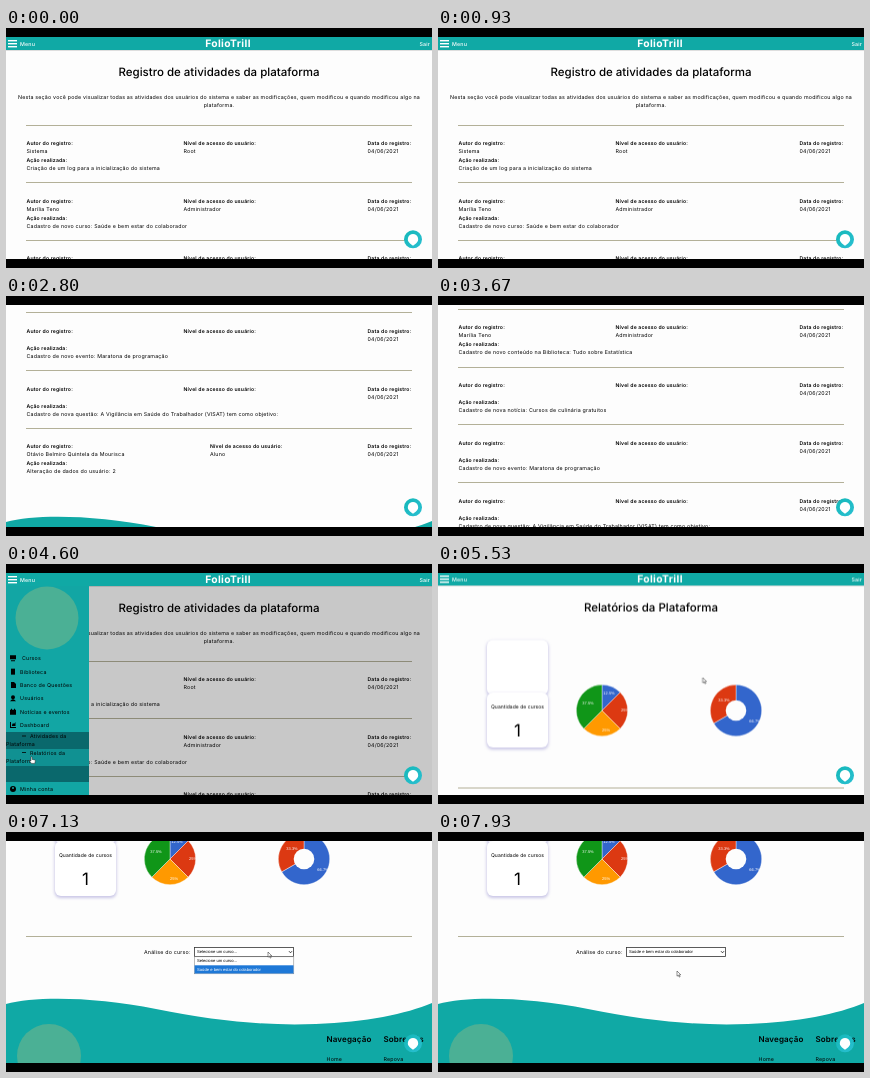
Recreate the animation shown at these times as an HTML page. Size 426x240 px, loop 8000 ms.

```html
<!DOCTYPE html>
<html lang="pt-BR">
<head>
<meta charset="utf-8">
<title>Registro de atividades</title>
<style>
  html, body { margin: 0; width: 100%; height: 100%; overflow: hidden; background: #000; }
  svg { display: block; width: 100vw; height: 100vh; }
  text { font-family: Inter, "Open Sans", sans-serif; text-rendering: geometricPrecision; }
  .native { font-family: "Liberation Sans", Arial, sans-serif; }
</style>
</head>
<body>
<svg id="stage" viewBox="0 0 426 240" xmlns="http://www.w3.org/2000/svg"></svg>
<script>
const LOOP = 8000;
const TEAL = '#10a9a5', INK = '#000', RULE = '#b3b098', LOGO = '#4bb095';
const ROW_TOP = 115, ROW_STEP = 57.7;
const LOG_END = 311, LOG_MID = 199, DASH_END = 120;

// y is the middle of the capital letters
function text(x, y, str, o = {}) {
  const { size = 5.3, weight = 400, fill = INK, anchor = 'start', gap = 0.2, cls = '' } = o;
  return `<text x="${x}" y="${y + size * 0.36}" font-size="${size}" font-weight="${weight}" fill="${fill}"
    text-anchor="${anchor}" letter-spacing="${gap}" class="${cls}">${str}</text>`;
}
const rect = (x, y, w, h, fill, extra = '') =>
  `<rect x="${x}" y="${y}" width="${w}" height="${h}" fill="${fill}" ${extra}/>`;
const circle = (x, y, r, fill) => `<circle cx="${x}" cy="${y}" r="${r}" fill="${fill}"/>`;
const rule = y => rect(20, Math.floor(y), 386, 1, RULE);
const label = (x, y, str) => text(x, y, str, { size: 5.1, weight: 600, gap: 0.18 });
const native = (x, y, str, fill = INK) => text(x, y, str, { size: 4.16, gap: 0, cls: 'native', fill });

function header() {
  const white = { fill: '#fff', weight: 500 };
  const bars = [12, 15, 18].map(y => rect(2, y, 9, 1.4, '#fff')).join('');
  return rect(0, 22, 426, 1, '#000', 'opacity=".12"') + rect(0, 0, 426, 22, TEAL) + bars +
    text(14, 16, 'Menu', white) + text(413.5, 16, 'Sair', white) +
    text(222, 15.5, 'FolioTrill', { size: 10.3, weight: 700, fill: '#fff', anchor: 'middle', gap: 0.35 });
}

const heading = str => text(213, 44, str, { size: 11.5, weight: 500, anchor: 'middle', gap: 0 });

function footer(dy) {
  const title = { size: 8, weight: 600, gap: 0.15 };
  return `<g transform="translate(0 ${dy})">
    <path d="M0 172C30 164 90 165 150 177S260 194 310 192S400 182 426 171V420H0Z" fill="${TEAL}"/>` +
    circle(43, 224, 32, LOGO) +
    text(320.5, 207, 'Navegação', title) + text(377.5, 207, 'Sobre nós', title) +
    text(320.5, 227.5, 'Home') + text(377.5, 227.5, 'Repova') + '</g>';
}

const ADMIN = ['Marília Teno', 'Administrador'];
const records = [
  ['Sistema', 'Root', 'Criação de um log para a inicialização do sistema'],
  [...ADMIN, 'Cadastro de novo curso: Saúde e bem estar do colaborador'],
  [...ADMIN, 'Cadastro de novo conteúdo na Biblioteca: Tudo sobre Estatística'],
  ['', '', 'Cadastro de nova notícia: Cursos de culinária gratuitos'],
  ['', '', 'Cadastro de novo evento: Maratona de programação'],
  ['', '', 'Cadastro de nova questão: A Vigilância em Saúde do Trabalhador (VISAT) tem como objetivo:'],
  ['Otávio Belmiro Quintela da Mourisca', 'Aluno', 'Alteração de dados do usuário: 2', 204],
];

function record([author, level, action, levelX = 177.5], i) {
  const top = ROW_TOP + i * ROW_STEP, y = Math.round(top);
  return rule(top - 18) +
    label(20.5, y, 'Autor do registro:') + text(20.5, y + 8.4, author) +
    label(levelX, y, 'Nível de acesso do usuário:') + text(levelX, y + 8.4, level) +
    label(361.5, y, 'Data do registro:') + text(361.5, y + 8.4, '04/06/2021') +
    label(20.5, y + 16.7, 'Ação realizada:') + text(20.5, y + 25.2, action);
}

function logPage() {
  const mid = { anchor: 'middle' };
  return rect(0, 0, 426, 900, '#fdfdfd') + header() + heading('Registro de atividades da plataforma') +
    text(213, 69, 'Nesta seção você pode visualizar todas as atividades dos usuários do sistema e saber ' +
      'as modificações, quem modificou e quando modificou algo na', mid) +
    text(213, 77.2, 'plataforma.', mid) +
    records.map(record).join('') + footer(LOG_END + 54);
}

// Slices run clockwise from twelve o'clock: [share, colour]
function pie(cx, cy, r, slices) {
  let turn = 0;
  const point = t => `${cx + r * Math.sin(t * 2 * Math.PI)} ${cy - r * Math.cos(t * 2 * Math.PI)}`;
  return slices.map(([share, fill]) => {
    const start = point(turn);
    turn += share;
    return `<path d="M${cx} ${cy}L${start}A${r} ${r} 0 ${+(share > 0.5)} 1 ${point(turn)}Z"
      fill="${fill}" stroke="#fff" stroke-width=".4"/>`;
  }).join('');
}

const card = y => rect(48.5, y + 1, 62, 56, '#c9c6e6', 'rx="6" filter="url(#soft)"') +
  rect(49, y, 61, 55, '#fff', 'rx="6"');

function dashboardPage() {
  const top = DASH_END;
  const [red, blue, green, orange] = ['#dc3912', '#3366cc', '#109618', '#ff9900'];
  const tag = (x, y, str) => text(x, y, str, { size: 4, fill: '#fff', anchor: 'middle', gap: 0, cls: 'native' });
  return rect(0, 0, 426, 700, '#fdfdfd') + header() + heading('Relatórios da Plataforma') +
    card(top - 43.5) + card(top + 14 - 5) +
    text(79.5, top + 23, 'Quantidade de cursos', { size: 5, anchor: 'middle', gap: 0.05 }) +
    text(79.5, top + 47, '1', { size: 17, anchor: 'middle', gap: 0 }) +
    pie(164, top + 27, 25.7, [[0.125, blue], [0.25, red], [0.25, orange], [0.375, green]]) +
    tag(150, top + 19.5, '37.5%') + tag(187, top + 27, '25%') + tag(168, top + 46.5, '25%') +
    tag(171, top + 10, '12.5%') +
    pie(298, top + 27, 25.7, [[2 / 3, blue], [1 / 3, red]]) + circle(298, top + 27, 10.3, '#fdfdfd') +
    tag(286, top + 17, '33.3%') + tag(317, top + 37.5, '66.7%') +
    rule(top + 104) + text(138, top + 120, 'Análise do curso:') +
    rect(188.5, top + 115.5, 99, 9, '#fff', 'stroke="#333" stroke-width=".8"') +
    `<path d="M283 ${top + 119.2}l1.5 1.6 1.5-1.6" fill="none" stroke="#111" stroke-width=".8"/>` +
    `<g id="prompt">${native(191, top + 120, 'Selecione um curso...')}</g>` +
    `<g id="choice">${native(191, top + 120, 'Saúde e bem estar do colaborador')}</g>` +
    footer(top) +
    `<g id="options">` + rect(188.3, top + 124.8, 99.5, 17, '#fff', 'stroke="#777" stroke-width=".5"') +
    rect(188.6, top + 133.3, 98.9, 8.2, '#1e78d7') +
    native(191, top + 129, 'Selecione um curso...') +
    native(191, top + 137.4, 'Saúde e bem estar do colaborador', '#fff') + '</g>';
}

function sidebar() {
  const icons = [
    'M0 0h6v4H0zM1 5h4v1H1z', 'M1 0h4v6H1z', 'M1 0h3l2 2v4H1z', 'M1 2a2 2 0 1 1 4 0a2 2 0 1 1-4 0M0 6q3-4 6 0z',
    'M0 1h6v5H0zM1 0h1v1H1zM4 0h1v1H4z', 'M0 0h1v5h5v1H0zM2 3l1-2 1 1 1.5-2v4H2z',
  ];
  const names = ['Cursos', 'Biblioteca', 'Banco de Questões', 'Usuários', 'Notícias e eventos', 'Dashboard'];
  const items = names.map((name, i) => {
    const y = 94.3 + i * 13.35;
    return `<path transform="translate(4 ${y - 3})" d="${icons[i]}"/>` + text(i < 1 ? 16 : 14, y, name);
  }).join('');
  const sub = (y, name) => rect(16, y - 0.4, 4, 0.8, INK) + text(24, y, name + ' da') +
    text(0, y + 8.4, 'Plataforma');
  return rect(0, 22, 83, 210, '#12a6a4') + circle(41, 54, 31.5, LOGO) + items +
    rect(0, 168, 83, 50, '#0a686c') + rect(0, 185, 83, 17, '#109192') +
    sub(172, 'Atividades') + sub(188.6, 'Relatórios') +
    circle(7, 225, 3, INK) + circle(7, 224, 1, '#12a6a4') + text(14, 225, 'Minha conta');
}

const chat = () => circle(407, 211.3, 9, 'url(#bubble)') +
  `<path d="M407 206a5.2 5.2 0 0 1 3 9.4l-3 2.4-3-2.4a5.2 5.2 0 0 1 3-9.4z" fill="#fff"/>`;

const pointer = `<g id="cursor">
  <path id="arrow" d="M0 0v5.2l1.3-1.1.9 2 .9-.4-.9-1.9h1.6z" fill="#fff" stroke="#222" stroke-width=".5"/>
  <path id="hand" d="M0 0q.7-.7 1.2 0v2.4l2.6.6q.6.2.5 1L3.8 6.4H.4L-1.4 4q0-1 1.4-.2z"
    fill="#fff" stroke="#222" stroke-width=".5"/></g>`;

document.getElementById('stage').innerHTML = `
  <defs>
    <linearGradient id="bubble" x2="1" y2="1"><stop stop-color="#14b8b8"/><stop offset="1" stop-color="#2abfd2"/></linearGradient>
    <filter id="soft" x="-20%" y="-20%" width="140%" height="140%"><feGaussianBlur stdDeviation="1.6"/></filter>
  </defs>
  <g id="log">${logPage()}</g>
  <g id="dash">${dashboardPage()}</g>
  <g id="shade">${rect(0, 22, 426, 210, '#000')}</g>
  <g id="side">${sidebar()}</g>
  ${chat()}${pointer}
  ${rect(0, 0, 426, 9, '#000')}${rect(0, 231, 426, 9, '#000')}`;

// Steps are [time, value, easing towards the next step]
function play(id, prop, steps, format = v => v) {
  const last = steps[steps.length - 1];
  const frames = [...steps, [LOOP, last[1]]].map(([time, value, easing = 'linear']) =>
    ({ offset: time / LOOP, [prop]: format(value), easing }));
  const run = document.getElementById(id).animate(frames, { duration: LOOP, iterations: Infinity });
  run.startTime = 0;
}
const toggle = (id, steps) => play(id, 'opacity', steps.map(([t, v]) => [t, v, 'step-end']));
const scroll = (id, steps) => play(id, 'transform', steps, v => `translate(0px, ${-v}px)`);

const LOAD = 5000, OPEN = 7050, PICK = 7650;
scroll('log', [[0, 0], [1000, 0, 'ease-in-out'], [1950, LOG_END], [3300, LOG_END, 'ease-in'],
  [3640, LOG_MID], [3700, LOG_MID, 'ease-out'], [4050, 0]]);
scroll('dash', [[0, 0], [5500, 0, 'ease-in-out'], [6150, DASH_END]]);
toggle('dash', [[0, 0], [LOAD, 1]]);
play('side', 'transform', [[0, -84], [4200, -84, 'ease-out'], [4400, 0], [LOAD, 0, 'step-end'], [LOAD + 1, -84]],
  v => `translate(${v}px, 0px)`);
play('shade', 'opacity', [[0, 0], [4200, 0], [4400, 0.21], [LOAD, 0.21, 'step-end'], [LOAD + 1, 0]]);
toggle('prompt', [[0, 1], [PICK, 0]]);
toggle('choice', [[0, 0], [PICK, 1]]);
toggle('options', [[0, 0], [OPEN, 1], [PICK, 0]]);
toggle('cursor', [[0, 0], [4100, 1]]);
toggle('arrow', [[0, 1], [4400, 0], [LOAD, 1]]);
toggle('hand', [[0, 0], [4400, 1], [LOAD, 0]]);
play('cursor', 'transform', [[0, [7, 16]], [4200, [7, 16], 'ease-in-out'], [4560, [25, 193]],
  [5100, [25, 193], 'ease-in-out'], [5700, [312, 98]], [6500, [312, 98], 'ease-in-out'],
  [6950, [262, 120]], [7150, [262, 120], 'ease-in-out'], [7500, [239, 139]]],
  ([x, y]) => `translate(${x}px, ${y}px)`);
</script>
</body>
</html>
```
